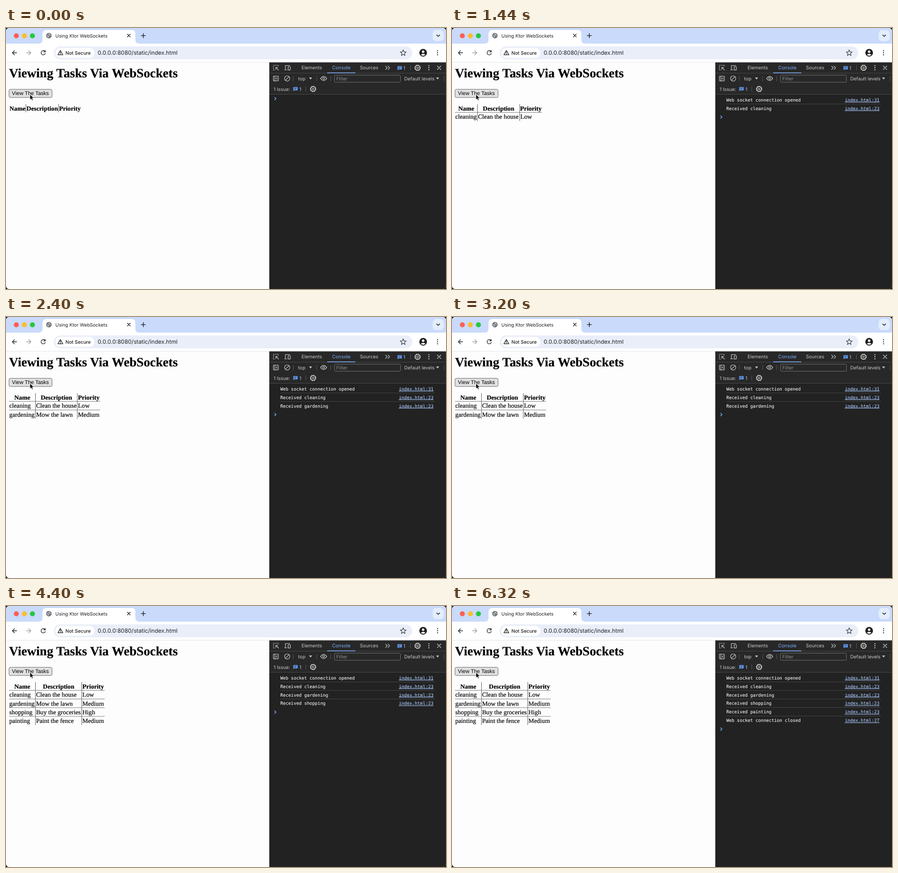
Write an HTML page that moves like this. It is 874 px wide and 518 px high and loops after 6400 ms.

```html
<!DOCTYPE html>
<html lang="en">
<head>
<meta charset="utf-8">
<title>Viewing Tasks</title>
<style>
  html, body { margin: 0; width: 100%; height: 100%; overflow: hidden; background: #000; }
  svg { display: block; width: 874px; height: 518px; }
  text { white-space: pre; text-rendering: geometricPrecision; }
  .ui { font-family: Inter, Roboto, sans-serif; font-size: 9.45px; }
  .serif { font: 12.63px "Liberation Serif", serif; stroke: #000; stroke-width: .18px; }
  .bold { font-weight: 700; }
  .mono { font: 8.77px "DejaVu Sans Mono", monospace; fill: #f2f2f2; stroke: #f2f2f2; stroke-width: .12px; }
  .link { fill: #a8c7fa; stroke: #a8c7fa; text-decoration: underline; }
  .mid { text-anchor: middle; }
  .pen { fill: none; stroke-linecap: round; stroke-linejoin: round; }
</style>
</head>
<body>
<svg viewBox="0 0 874 518" xmlns="http://www.w3.org/2000/svg">
  <defs>
    <clipPath id="win"><rect width="874" height="518" rx="6"/></clipPath>
    <g id="gear" class="pen" stroke="#c7c7c7">
      <circle r="5.3" stroke-width="1.6" stroke-dasharray="2.1 2.063"/>
      <circle r="4.5" stroke-width="1.1"/>
      <circle r="1.700" stroke-width="1.1"/>
    </g>
    <g id="msg">
      <path d="M-4.3 -3.6H4.3V2.9H-2.5L-4.3 4.6Z" fill="#669df6"/>
      <path d="M-2.6 -1.5H2.6M-2.6 .7H1.2" stroke="#22344f" stroke-width=".9"/>
    </g>
    <g id="dots"><circle cy="-4" r="1.15"/><circle r="1.15"/><circle cy="4" r="1.15"/></g>
  </defs>
  <g clip-path="url(#win)">
    <rect width="874" height="518" fill="#fdfdfd"/>

    <!-- tab strip -->
    <rect width="874" height="31" fill="#c9dafb"/>
    <path d="M65 31Q72.500 31 72.500 23.500V11.500Q72.500 4 80 4H249.500Q257 4 257 11.500V23.500Q257 31 264.500 31Z" fill="#fff"/>
    <circle cx="20.500" cy="15.500" r="5" fill="#fe5f57"/>
    <circle cx="36.500" cy="15.500" r="5" fill="#febc2e"/>
    <circle cx="52.500" cy="15.500" r="5" fill="#28c840"/>
    <circle cx="85.200" cy="15.200" r="5.500" fill="#74787d"/>
    <path d="M81.500 14.800L84.500 16L83.600 18.500M86 11.500L85.300 13.300L88.500 14.800" class="pen" stroke="#e0e2e5" stroke-width="1.200"/>
    <text x="98" y="18.500" class="ui" style="font-size:9.3px" fill="#1f1f1f">Using Ktor WebSockets</text>
    <g class="pen" stroke="#1f1f1f" stroke-width="1.300">
      <path d="M241.300 12.300L246.700 17.700M246.700 12.300L241.300 17.700M268.500 15.200H276.900M272.700 11V19.400"/>
    </g>
    <rect x="847.500" y="4" width="22" height="22" rx="7" fill="#e4edfd"/>
    <path d="M855.500 13.800L858.500 16.800L861.500 13.800" class="pen" stroke="#1f1f1f" stroke-width="1.400"/>

    <!-- address bar -->
    <rect y="31" width="874" height="37" fill="#fff"/>
    <rect y="67.600" width="874" height=".9" fill="#dfe1e6"/>
    <g class="pen" stroke="#303236" stroke-width="1.350">
      <path d="M21.200 49.200H12.800M16.800 45L12.600 49.200L16.800 53.400"/>
      <path d="M40.800 49.200H49.200M45.200 45L49.400 49.200L45.200 53.400" stroke="#a5a7aa"/>
      <path d="M77.600 46.600A4.300 4.300 0 1 0 78.100 50.600M78 44.600V47.500H75"/>
    </g>
    <rect x="95" y="36.500" width="712" height="25.800" rx="12.900" fill="#e9eef9"/>
    <rect x="98" y="39.500" width="77.500" height="19.800" rx="9.900" fill="#fff"/>
    <path d="M108 44.600L113 53.200H103ZM108 47.600V50.200M108 51.700V51.800" class="pen" stroke="#1f1f1f" stroke-width="1.200"/>
    <text x="118" y="52.500" class="ui" font-weight="500" fill="#1f1f1f">Not Secure</text>
    <text x="182" y="53.100" class="ui" style="font-size:11.2px" fill="#202124">0.0.0.0:8080/static/index.html</text>
    <path id="star" class="pen" stroke="#3c4043" stroke-width="1.150"/>
    <circle cx="828.600" cy="49.200" r="7.600" fill="#1f1f1f"/>
    <circle cx="828.600" cy="46.900" r="2.500" fill="#fff"/>
    <path d="M824 53Q828.600 49.300 833.200 53Q828.600 57.200 824 53Z" fill="#fff"/>
    <use href="#dots" x="857.200" y="49.200" fill="#303236"/>

    <!-- page -->
    <text x="6" y="98" class="serif bold" style="font-size:25.4px">Viewing Tasks Via WebSockets</text>
    <rect id="button" x="6" y="121.700" width="85.500" height="16.200" rx="2.600" stroke="#606060" stroke-width=".9"/>
    <text x="48.500" y="133.200" class="mid" style="font:10.55px 'Liberation Sans',sans-serif">View The Tasks</text>
    <g id="table"></g>
    <circle id="ring" cx="47.500" cy="132" r="17" fill="none" stroke="#111" stroke-width="1.400"/>
    <path d="M47.600 131.600V142.600L50.100 140.300L51.700 144.100L53.600 143.300L52 139.600H55.200Z" fill="#000" stroke="#fff" stroke-width=".8"/>

    <!-- developer tools -->
    <rect x="523" y="68.500" width="351" height="450" fill="#222"/>
    <rect x="523" y="68.500" width="351" height="63" fill="#282828"/>
    <path d="M523 89.600H874M523 131.500H874" stroke="#4a4a4a" stroke-width=".9"/>
    <path d="M638 89H694" stroke="#7cacf8" stroke-width="1.700"/>
    <path d="M570.500 95.500V105.500M617 95.500V105.500M645 95.500V105.500M803.500 74V84M870 95.500V105.500M595.500 116V126" stroke="#5a5a5a" stroke-width=".9"/>
    <g class="pen" stroke="#c7c7c7" stroke-width="1.150">
      <path d="M531.300 74H541" stroke-dasharray="1.300 2"/>
      <path d="M531.300 76V83.500H534M541 74V76.500" stroke-dasharray="1.300 2"/>
      <path d="M541.300 83.500L536 78.200M536 82V78.200H539.800"/>
      <path d="M555 82.800V74.500H563.500M553.300 83H558.300"/>
      <rect x="560.500" y="76.700" width="4.300" height="6.700" rx=".6"/>
      <path d="M754 75.700L757.200 79L754 82.300M758.800 75.700L762 79L758.800 82.300"/>
      <path d="M856.700 75.500L863.700 82.500M863.700 75.500L856.700 82.500"/>
      <rect x="531.200" y="95.500" width="9.800" height="9.400" rx=".8"/>
      <path d="M534.200 95.500V104.900M538.700 98.300L536.800 100.200L538.700 102.100"/>
      <circle cx="558.500" cy="100.200" r="5.200"/>
      <path d="M562.100 96.600L554.900 103.800"/>
      <path d="M624.800 100.200Q631 91.900 637.200 100.200Q631 108.500 624.800 100.200Z"/>
      <circle cx="631" cy="100.200" r="1.900"/>
    </g>
    <g fill="#c7c7c7">
      <path d="M602 98.300H608L605 102.300ZM854.300 98.300H860.300L857.300 102.300Z"/>
      <use href="#dots" x="840" y="79"/>
    </g>
    <use href="#gear" x="817.500" y="79"/>
    <use href="#gear" x="610" y="121"/>
    <use href="#msg" x="782" y="79.300"/>
    <use href="#msg" x="575" y="120.800"/>
    <rect x="652.500" y="93.600" width="131" height="14" rx="2" fill="#282828" stroke="#757575" stroke-width=".9"/>
    <g class="ui" fill="#c7c7c7">
      <text x="587" y="82.400">Elements</text>
      <text x="647.800" y="82.400" fill="#7cacf8">Console</text>
      <text x="703" y="82.400">Sources</text>
      <text x="789.300" y="82.900" fill="#a8c7fa">1</text>
      <text x="580.300" y="103.700">top</text>
      <text x="656" y="103.700" fill="#8f8f8f">Filter</text>
      <text x="791" y="103.700">Default levels</text>
      <text x="531.500" y="124.500">1 Issue:</text>
      <text x="582.700" y="124.500" fill="#a8c7fa">1</text>
    </g>
    <g id="log"></g>
    <path id="prompt" d="M533.600 -2.600L536.400 0L533.600 2.600" class="pen" stroke="#7cacf8" stroke-width="1.300"/>
  </g>
</svg>
<script>
const LOOP = 6400, PRESS = 960, RELEASE = 1360;
const LEFT = 6, TOP = 151, ROW = 17.2, LOG_ROW = 16.9;
const heads = ["Name", "Description", "Priority"];
const tasks = [
  { at: 1440, cells: ["cleaning", "Clean the house", "Low"] },
  { at: 2400, cells: ["gardening", "Mow the lawn", "Medium"] },
  { at: 3440, cells: ["shopping", "Buy the groceries", "High"] },
  { at: 4400, cells: ["painting", "Paint the fence", "Medium"] }
];
// right edges of the three columns, by number of rows
const edges = [[39.5, 104.5, 149.3], [50.5, 134.5, 179], [58.5, 141.7, 187],
               [58.5, 150.5, 196], [58.5, 150.5, 196]];
const logs = [
  { at: 1360, text: "Web socket connection opened", line: 31 },
  { at: 1440, text: "Received cleaning", line: 23 },
  { at: 2400, text: "Received gardening", line: 23 },
  { at: 3440, text: "Received shopping", line: 23 },
  { at: 4480, text: "Received painting", line: 23 },
  { at: 5440, text: "Web socket connection closed", line: 27 }
];

const $ = id => document.getElementById(id);
const text = (x, y, cls, s) => `<text x="${x}" y="${y}" class="${cls}">${s}</text>`;
const rule = (x1, y1, x2, y2, color) =>
  `<path d="M${x1} ${y1}L${x2} ${y2}" stroke="${color}" stroke-width=".9"/>`;
const passed = (list, t) => list.filter(e => t >= e.at).length;

function tableMarkup(n) {
  const right = edges[n], starts = [LEFT, right[0], right[1]];
  const bottom = TOP + (n + 1) * ROW - 0.8;
  let out = "";
  heads.forEach((h, i) => {
    out += text((starts[i] + right[i]) / 2, 163.5, "serif bold mid", h);
    if (i < 2) out += rule(right[i], TOP, right[i], bottom, "#555");
  });
  tasks.slice(0, n).forEach((task, r) => {
    const y = 167.4 + r * ROW;
    out += rule(LEFT, y, right[2], y, "#777");
    task.cells.forEach((c, i) => {
      out += text(starts[i] + (i ? 1.2 : 0.4), 180.4 + r * ROW, "serif", c);
    });
  });
  return out;
}

function logMarkup(n) {
  return logs.slice(0, n).map((e, i) => {
    const y = 145.7 + i * LOG_ROW;
    return (i ? rule(545, y - 11.8, 852, y - 11.8, "#474747") : "") +
      text(545, y, "mono", e.text) + text(780.4, y, "mono link", "index.html:" + e.line);
  }).join("");
}

function starPath() {
  const pts = Array.from({ length: 10 }, (_, i) => {
    const r = i % 2 ? 2.7 : 6.2, a = i * Math.PI / 5;
    return (789 + r * Math.sin(a)).toFixed(2) + " " + (49.5 - r * Math.cos(a)).toFixed(2);
  });
  return "M" + pts.join("L") + "Z";
}

let shown = "";
function render(t) {
  const rows = passed(tasks, t), lines = passed(logs, t);
  const pressed = t >= PRESS && t < RELEASE;
  const key = [rows, lines, pressed].join();
  if (key === shown) return;
  shown = key;
  $("table").innerHTML = tableMarkup(rows);
  $("log").innerHTML = logMarkup(lines);
  $("prompt").setAttribute("transform", `translate(0 ${lines ? 143 + lines * LOG_ROW : 140.2})`);
  $("button").setAttribute("fill", pressed ? "#f3f3f3" : "#e1e1e1");
  $("ring").setAttribute("visibility", pressed ? "visible" : "hidden");
}

$("star").setAttribute("d", starPath());
const start = performance.now();
function tick() {
  render((performance.now() - start) % LOOP);
  requestAnimationFrame(tick);
}
tick();
</script>
</body>
</html>
```
